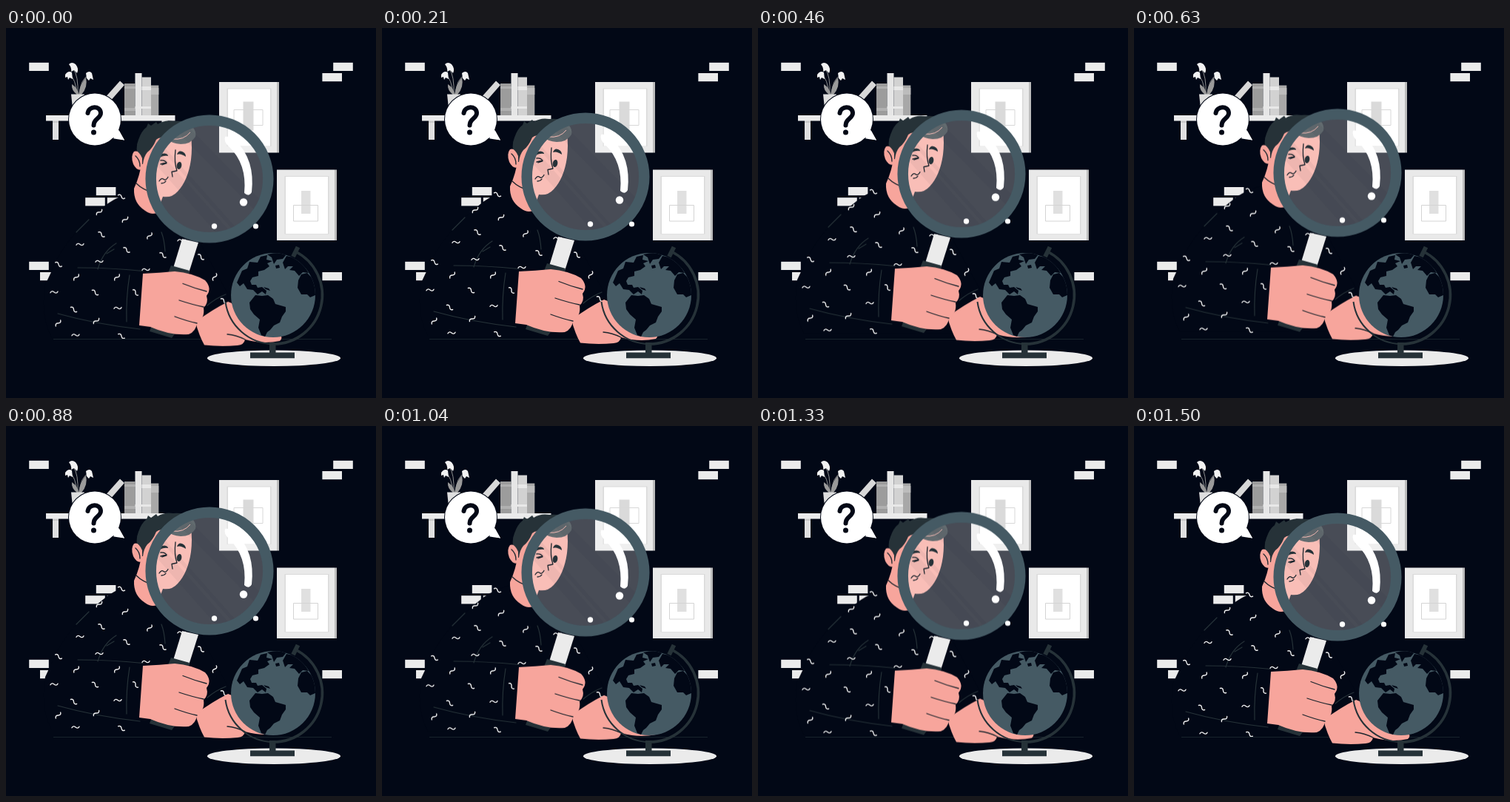
Animation, 500 px wide and 500 px high, one loop 1540 ms. Source, as an HTML page without scripts:

```html
<!DOCTYPE html>
<html lang="en">
<head>
<meta charset="utf-8">
<title>Looking closer</title>
<style>
  html, body { margin: 0; width: 100%; height: 100%; overflow: hidden; background: #020816; }
  svg { display: block; width: 100%; height: 100%; }
  .bob { animation: bob 1540ms -20ms infinite; }
  @keyframes bob {
    0% { transform: none; animation-timing-function: cubic-bezier(.3, .2, .6, 1); }
    49% { transform: translateY(-8.6px); animation-timing-function: cubic-bezier(.4, 0, .7, 1); }
    100% { transform: none; }
  }
  .night { fill: #020816; }
  .dark { fill: #263238; }
  .skin { fill: #f7a59c; }
  .slate { fill: #455a64; }
  .pale { fill: #ebebeb; }
  .line { fill: none; stroke: #1b252d; stroke-width: 1.3; stroke-linecap: round; stroke-linejoin: round; }
  .fold { fill: none; stroke: #263238; stroke-width: 1.2; stroke-linecap: round; }
</style>
</head>
<body>
<svg viewBox="0 0 500 500">
  <defs>
    <rect id="brick" width="26.600" height="11.200" fill="#ebebeb"/>
    <path id="wave" d="M-5 .8C-3.800-1.800-1.800-1.500 0 0S3.800 1.800 5-.8" fill="none" stroke="#f2f2f2" stroke-width="1.400" stroke-linecap="round"/>
    <g id="frame">
      <path fill="#bdbdbd" d="M78 0h3v95.500h-3z"/>
      <path fill="#e9e9e9" d="M0 0h78v95.500H0z"/>
      <path fill="#dadada" d="M10.500 8.500h60v78.500h-60z"/>
      <path fill="#fff" d="M12 9.500h57v77H12z"/>
    </g>
    <clipPath id="sphere"><circle cx="361" cy="361" r="57"/></clipPath>
    <clipPath id="glass"><circle cx="275" cy="204" r="73"/></clipPath>
  </defs>

  <rect class="night" width="500" height="500"/>

  <!-- wall -->
  <use href="#brick" x="31.200" y="46.800"/><use href="#brick" x="442.200" y="46.800"/>
  <use href="#brick" x="427.400" y="61"/><use href="#brick" x="121.800" y="215"/>
  <use href="#brick" x="107.200" y="229.200"/><use href="#brick" x="136.800" y="229.200"/>
  <use href="#brick" x="31.200" y="315.800"/><use href="#brick" x="46" y="330"/>
  <use href="#brick" x="427.400" y="330"/>

  <!-- shelf -->
  <path fill="#e0e0e0" d="M63 125h8v26h-8zM210.500 125h8v26h-8z"/>
  <path fill="#c9c9c9" d="M63 125h8v3h-8z"/>
  <path class="pale" d="M54 118h174.500v7.500H54z"/>
  <path fill="#d8d8d8" d="M133 95l21-23.500 6 5.500-21 24z"/>
  <path fill="#9c9c9c" d="M160 75h14.500v43H160z"/>
  <path fill="#b0b0b0" d="M160 79h14.500v3H160zM160 108h14.500v4H160z"/>
  <path fill="#e6e6e6" d="M174.500 61h9v57h-9z"/>
  <path fill="#d2d2d2" d="M183.500 66.500H196V118h-12.500z"/>
  <path fill="#e8e8e8" d="M183.500 79H196v5h-12.500zM174.500 106H196v3h-21.500z"/>
  <path fill="#a8a8a8" d="M196 77.500h10.300V118H196z"/>
  <path fill="#bcbcbc" d="M196 81h10.300v9H196z"/>
  <path fill="none" stroke="#8f8f8f" d="M97 90Q98 65 91 55M96 90Q94 68 86 63M99 90Q101 68 112 64"/>
  <path fill="#9a9a9a" d="M96 90Q88 84 89 76Q97 81 98 90zM98 90Q100 76 108 67Q111 80 102 90z"/>
  <g fill="#f2f2f2">
    <path d="M85 49q4-4 9 0q5 6 2 12l-4-4-4 2q1-5-3-10z"/>
    <path d="M80 63q4-6 9-3l1 9-4-2-2 3-1-4-3 1z"/>
    <path d="M108 61q5-4 8 0l2 9-4-2-2 3-3-3z"/>
  </g>
  <path fill="#dedede" d="M88 89.500h18l-3 28.500H91z"/>

  <!-- pictures -->
  <use href="#frame" x="288" y="73"/>
  <path fill="#dadada" d="M320.500 99.500h14v39h-14z"/>
  <path fill="none" stroke="#d8d8d8" d="M308 110.500h39v21h-39z"/>
  <use href="#frame" x="366" y="191.500"/>
  <path fill="#e0e0e0" d="M399 220h12.500v31H399z"/>
  <path fill="none" stroke="#d4d4d4" d="M388.500 239.500h33v21.500h-33z"/>

  <!-- question bubble -->
  <g stroke="#020816" stroke-width="2" paint-order="stroke" fill="#fff">
    <path d="M143 149Q150 150 160 151.500L152 137z"/>
    <circle cx="120" cy="123.500" r="35"/>
  </g>
  <path fill="#fff" d="M140 147L160 151.500 151 136z"/>
  <path fill="none" stroke="#020816" stroke-width="6" stroke-linecap="round" d="M110.500 115C112 105 127 104.500 128 114.500C128.500 122.500 118.500 122 118.500 131.500"/>
  <circle class="night" cx="118.500" cy="141" r="3.500"/>

  <!-- body and head -->
  <g class="bob">
    <path class="night" d="M176 221Q154 226 138 237Q112 257 95 276Q70 305 61 330L53 347Q46 390 62 419H290L300 360 262 290 205 240z"/>
    <path class="skin" d="M184 178Q181 200 173 217Q172 237 188 247Q196 253 204 250L212 228Q224 230 232 221Q246 206 250 178Q252 162 250 145L205 140z"/>
    <path class="line" d="M176 210Q185 219 200 223"/>
    <path class="dark" d="M182 184Q173 165 179 151Q183 139 190 134L192 129 196 132 203 127 205 130Q214 124 226 126Q242 125 249 131Q258 138 256 147Q250 157 236 157Q224 156 217 150Q208 146 203 151Q198 163 191 168Q186 174 185 184z"/>
    <path class="skin" d="M184 176Q179 164 173 167Q168 173 172 184Q177 194 184 191z"/>
    <path class="line" d="M175 173Q181 178 181 187"/>
    <path d="M225 150Q240 152 249 141" fill="none" stroke="#f7a59c"/>
    <path class="fold" d="M97 324Q140 324 185 328.500M70 386Q120 400 181 407M167 334Q162 365 163 397M124 326Q131 302 149 291M136 305L146 299M272 375Q284 365 297 360M210 276Q214 286 215 302M95 276L112 259"/>
    <use href="#wave" transform="translate(126 249) rotate(-35)"/>
    <use href="#wave" transform="translate(156 228) rotate(35)"/>
    <use href="#wave" transform="translate(161 259) rotate(-35)"/>
    <use href="#wave" transform="translate(100 292.500)"/>
    <use href="#wave" transform="translate(129 279) rotate(45)"/>
    <use href="#wave" transform="translate(71 319.500) rotate(40)"/>
    <use href="#wave" transform="translate(126 315.500)"/>
    <use href="#wave" transform="translate(163 300) rotate(45)"/>
    <use href="#wave" transform="translate(194 281) rotate(-45)"/>
    <use href="#wave" transform="translate(189 326.500)"/>
    <use href="#wave" transform="translate(212 307) rotate(45)"/>
    <use href="#wave" transform="translate(95 337) rotate(-42)"/>
    <use href="#wave" transform="translate(150 337) rotate(-42)"/>
    <use href="#wave" transform="translate(65 357)"/>
    <use href="#wave" transform="translate(120.500 357.500) rotate(45)"/>
    <use href="#wave" transform="translate(175 357.500) rotate(55)"/>
    <use href="#wave" transform="translate(91.500 380.500) rotate(45)"/>
    <use href="#wave" transform="translate(151 378.500)"/>
    <use href="#wave" transform="translate(122 396) rotate(-35)"/>
    <use href="#wave" transform="translate(70.500 399) rotate(-42)"/>
    <use href="#wave" transform="translate(94 415)"/>
    <use href="#wave" transform="translate(156 416.500) rotate(42)"/>
    <use href="#wave" transform="translate(237 287)"/>
    <use href="#wave" transform="translate(263.500 309.500) rotate(50)"/>
    <use href="#wave" transform="translate(282 336.500) rotate(-55)"/>
    <use href="#wave" transform="translate(294.500 369) rotate(45)"/>
  </g>

  <!-- table -->
  <path stroke="#18232c" d="M64 420.500H440"/>
  <ellipse class="pale" cx="362" cy="446.200" rx="90" ry="10.800"/>

  <!-- supporting hand -->
  <g class="bob">
    <path class="skin" d="M256 397.500Q278 381 300 370Q310 372 312 385L335 409Q350 416 370 415Q375 418 370 423Q348 428 323 421Q322 428 313 429Q290 431 268 428.500Q261 416 256 397.500z"/>
    <path class="line" d="M299 414Q311 415 323 421"/>
  </g>

  <!-- globe -->
  <circle class="slate" cx="361" cy="361" r="57"/>
  <g class="night" clip-path="url(#sphere)">
    <path d="M312 344L319 328 326 325 329 316 340 317 344 309 353 307 352 313 360 315 353 318 356 322 349 327 341 329 341 335 333 337 330 342 332 347 338 347 340 351 346 350 352 355 351 360 346 356 340 360 334 354 326 353 321 345 316 349z"/>
    <path d="M353 306Q368 302 379 306L374 312 366 313 362 319 359 310z"/>
    <path d="M329 371L337 361 346 362 354 361 361 366 364 373 378 377 378 383 373 390 370 398 362 402 357 408 353 411 350 417 345 415 341 405 343 394 335 387 330 380z"/>
    <path d="M374 317L379 308 389 310 402 320 409 331 401 330 396 335 390 328 383 327 388 322 381 322 377 326z"/>
    <path d="M399 333L407 331 414 338 420 350 418 361 411 364 407 360 399 360 394 351 395 341z"/>
    <path d="M364 321l5-1 1 4-5 1zM348 350l7 2 2 3-6-2z"/>
  </g>
  <path fill="none" stroke="#263238" stroke-width="3.600" d="M391 302A66 66 0 0 1 361 427"/>
  <path fill="none" stroke="#263238" stroke-width="2" d="M361 427A66 66 0 0 1 296.500 370"/>
  <path stroke="#263238" stroke-width="6" d="M394.500 296L388 309"/>
  <path class="dark" d="M356 425h8.500v13.500H390v7.800h-60v-7.800h26z"/>

  <!-- magnifier -->
  <g class="bob">
    <path class="pale" d="M238 285L260 290 247 331 225.500 326z"/>
    <path class="dark" d="M223 321L248 328 245 338 219 331zM197 402L230 411 224 419 194 410z"/>
    <circle cx="275" cy="204" r="73" fill="#fff" fill-opacity=".28"/>
    <g clip-path="url(#glass)" stroke="#020816" stroke-opacity=".045">
      <path stroke-width="15" d="M195 165L310 295M222 120L360 260"/>
      <path stroke-width="5" d="M205 155L325 290"/>
    </g>
    <path class="dark" d="M208 175Q207 170 214 169.500Q219 170 219 173Q213 172 208 175zM231 171Q233 165 238 167Q243 169 243 174Q236 169 231 171z"/>
    <ellipse class="dark" cx="234" cy="186" rx="3.300" ry="5" transform="rotate(12 234 186)"/>
    <path class="line" d="M209 179Q214 178 217 182L209 184M211 185L217 183M229 165Q227 182 231 193L224 194.500 225 201M207 207Q210 202 213 204.500T219 201.500M210 210Q214 210 216 207"/>
    <circle cx="275" cy="204" r="79.300" fill="none" stroke="#455a64" stroke-width="14.500"/>
    <path fill="#fff" d="M296 147Q303 146 310 152Q337 178 332 222Q328 229 322 223Q326 184 301 160Q294 154 296 147z"/>
    <circle cx="321" cy="235.500" r="5.200" fill="#fff"/>
    <circle cx="281.500" cy="268" r="3.700" fill="#fff"/>
    <circle cx="337.500" cy="268" r="3.600" fill="#fff"/>
    <path class="skin" d="M185 332Q208 331 228 329Q252 331 269 341Q279 352 271 362Q274 372 267 378Q269 393 258 398Q257 410 247 414Q222 416 195 404L180 402z"/>
    <path class="line" d="M239 345.500Q255 352 271 356M234 368Q252 374 267 377M228 390Q244 396 258 399"/>
  </g>
</svg>
</body>
</html>
```
